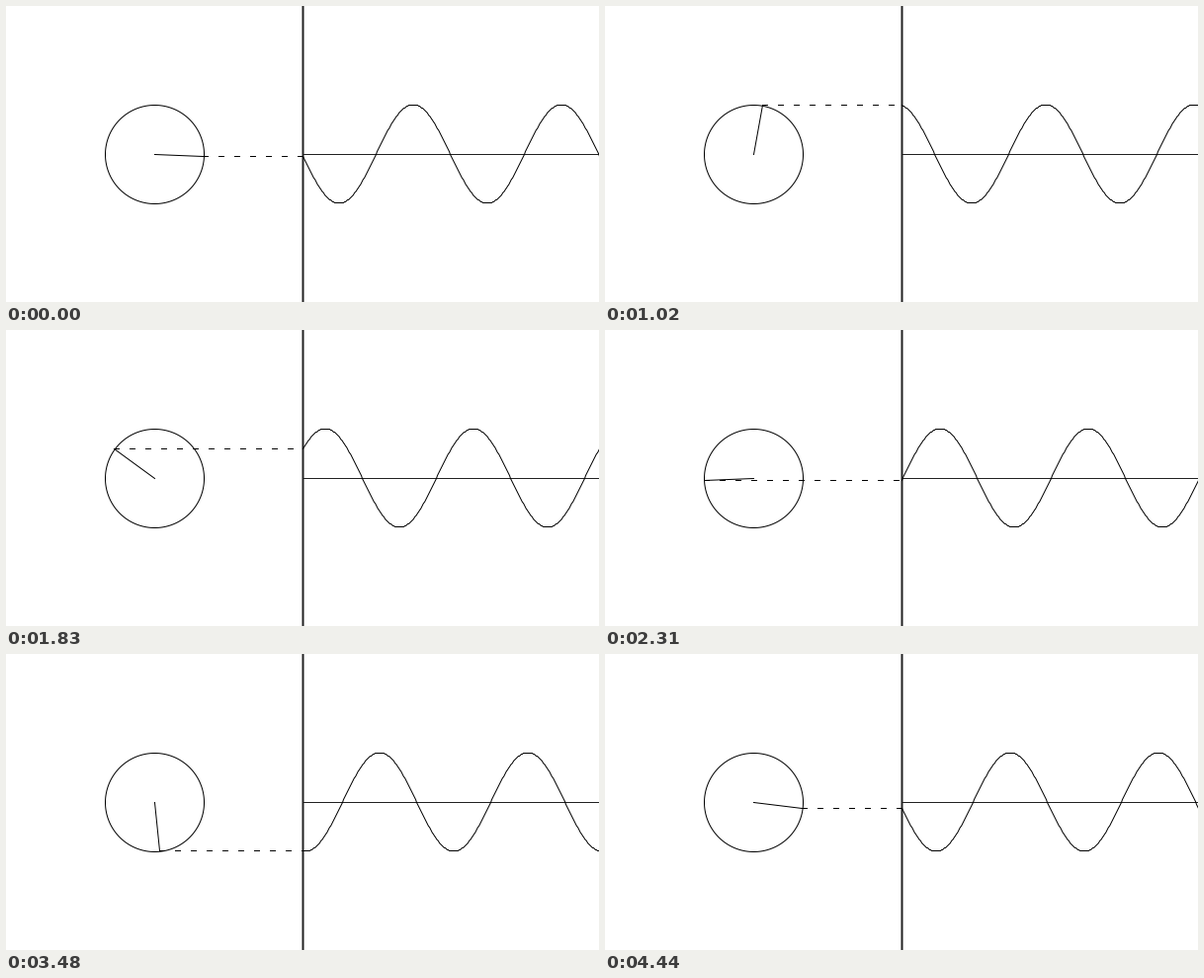
A matplotlib script for the animation above (4.47 s loop, 600 by 300 pixels).

```python
import numpy as np
import matplotlib.pyplot as plt
from matplotlib.animation import FuncAnimation

WIDTH, HEIGHT, DPI = 600, 300, 100
PX = 72 / DPI                      # one pixel in points
FRAMES, INTERVAL = 149, 30
CX, CY, RADIUS = 150, 150, 50
WALL = 300                         # x of the vertical line
STEP = np.radians(2.4)             # turn per frame, also wave phase per pixel
INK, AXIS_INK = "black", "#222222"

plt.rcParams["path.simplify"] = False

fig = plt.figure(figsize=(WIDTH / DPI, HEIGHT / DPI), dpi=DPI, facecolor="white")
ax = fig.add_axes([0, 0, 1, 1])
# Shifted by half a pixel so that whole numbers are pixel centres.
ax.set_xlim(-0.5, WIDTH - 0.5)
ax.set_ylim(HEIGHT - 0.5, -0.5)
ax.axis("off")


def stroke(x, y, width=1, color=INK, **style):
    line, = ax.plot(x, y, color=color, lw=width * PX, snap=False,
                    solid_capstyle="projecting", solid_joinstyle="round",
                    **style)
    return line


def tip(angle):
    """Pixel that the radius points at."""
    return (np.floor(CX + RADIUS * np.cos(angle)),
            np.floor(CY - RADIUS * np.sin(angle)))


turn = np.linspace(0, 2 * np.pi, 361)
stroke(CX + RADIUS * np.cos(turn), CY + RADIUS * np.sin(turn))
stroke([WALL, WALL], [0, HEIGHT], width=2, color=AXIS_INK)
stroke([WALL, WIDTH], [CY, CY], color=AXIS_INK)

wave_x = np.arange(WALL, WIDTH + 1)
wave = stroke(wave_x, np.full(wave_x.shape, CY))
radius = stroke([], [])
link = stroke([], [], dashes=(6, 10), dash_capstyle="butt")


def update(i):
    angle = STEP * (i - 1)
    x, y = tip(angle)
    radius.set_data([CX, x], [CY, y])
    link.set_data([x - 0.5, WALL + 0.5], [y, y])
    phase = angle - STEP * (wave_x - WALL)
    wave.set_ydata(np.floor(CY - RADIUS * np.sin(phase)))
    return radius, link, wave


anim = FuncAnimation(fig, update, frames=FRAMES, interval=INTERVAL,
                     repeat=True, repeat_delay=0)
plt.show()
```
